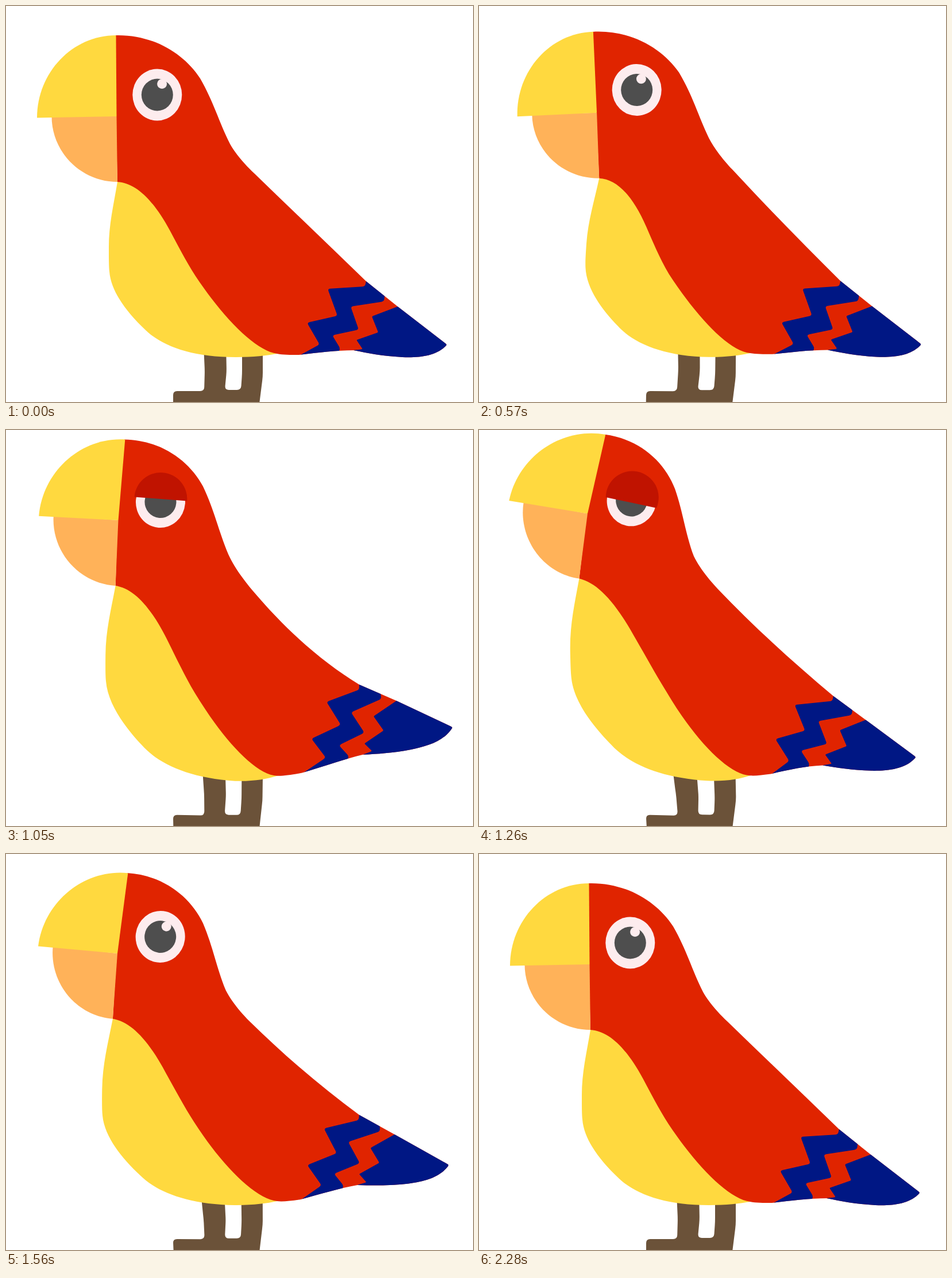
An HTML page for the animation above (2310 ms loop, 813 px wide and 689 px high).

```html
<!DOCTYPE html>
<html>
<head>
<meta charset="utf-8">
<style>
html, body { margin: 0; width: 100%; height: 100%; overflow: hidden; background: #fff; }
svg { display: block; width: 813px; height: 689px; }
</style>
</head>
<body>
<svg viewBox="0 0 813 689">
  <clipPath id="clip"><path id="outline"/></clipPath>
  <g id="bird"></g>
  <g id="eye">
    <ellipse rx="43" ry="45" fill="#fdecee"/>
    <ellipse rx="27.5" ry="28" fill="#4e4e4e"/>
    <circle cx="8.3" cy="-19" r="8.5" fill="#fdecee"/>
    <path id="lid" fill="#c01300"/>
  </g>
</svg>
<script>
const LOOP = 2310, STEP = 30;
const RED = '#e02400', YELLOW = '#ffd93f', BLUE = '#001784';
const byId = id => document.getElementById(id);

// Closed polygon with softened corners.
function soft(text, radius) {
  const pts = text.split(', ').map(p => p.split(' ').map(Number));
  const toward = (p, q) => {
    const k = radius / Math.hypot(q[0] - p[0], q[1] - p[1]);
    return p.map((v, i) => (v + (q[i] - v) * k).toFixed(1)).join(' ');
  };
  return pts.map((p, i) => {
    const before = pts.at(i - 1), after = pts[(i + 1) % pts.length];
    return `${i ? 'L' : 'M'}${toward(p, before)} Q${p.join(' ')} ${toward(p, after)}`;
  }).join(' ') + ' Z';
}

// Quarter ellipse sector from a top or bottom point to a side point.
function quarter(from, to, corner) {
  const ease = p => [p[0] + (to[0] - p[0]) * 0.55, p[1] + (from[1] - p[1]) * 0.55].join(' ');
  return `M${from.join(' ')} C${ease(from)} ${ease(to)} ${to.join(' ')} L${corner.join(' ')} Z`;
}

const joint = [192.5, 192], crown = [191.5, 51], chin = [194, 306], tailRoot = [627, 479];

const plumage = 'M190 51 C256 49 310 83 338 126 C362 168 370 200 390 240 C400 258 418 278 432 291 '
  + 'C497 354 562 416 627 479 L682 523 L765 587 Q768 589 766 591 C748 610 718 612 690 611 '
  + 'C655 609 630 604 605 599 C575 599 545 603 510 607 C495 607 482 607 472 605 '
  + 'C435 600 380 545 330 470 C312 442 298 414 285 390 C255 335 225 308 194 306 L191 192 Z';
const belly = 'M194 306 C187 348 179 380 179 420 C179 440 179 452 180 462 C183 500 215 537 240 561 '
  + 'C268 590 320 611 400 611 C430 611 455 608 472 605 L480 590 L340 440 L240 310 Z';
const legs = soft('344 590, 346 635, 345 670, 291 670, 291 700, 440 700, 447 645, 447 590, '
  + '411 590, 411 640, 409 668, 381 668, 384 635, 383 590', 7);
const band = soft('629 468, 625 488, 560 492, 577 539, 524 551, 546 589, 505 611, 574 612, '
  + '582 596, 568 573, 614 563, 600 523, 658 514, 660 498', 4.5);
const tip = soft('692 519, 637 540, 648 568, 610 581, 621 597, 604 599, 604 620, 780 620, 780 570', 2);

// Back to front: fill, resting path, kept inside the plumage or not.
const parts = [
  ['#6b5239', legs],
  [YELLOW, belly],
  [RED, plumage],
  [BLUE, band, true],
  [BLUE, tip, true],
  ['#ffb259', quarter(chin, [79.5, 192], joint)],
  [YELLOW, quarter(crown, [54, 194.5], joint)]
];

// A pose: head x, y, turn; chest x, y; tail x, y, turn.
const rest = Array(8).fill(0);
const lean = [21, -10.5, -2.8, 9, -12, 4, -1, 0];
const flick = [3, -35, 4.1, -6, -25, -12, -36, -13.5];
const stretch = [-3.5, -46.5, 10.4, -19, -29, -10, -16, -1.6];
const settle = [1.5, -19, 6.2, -12, -7, -12, -25, -8.9];

const mix = (a, b, k) => a.map((v, i) => v + (b[i] - v) * k);
const poseKeys = [[0, rest], [450, rest], [570, mix(rest, lean, 0.6)], [810, lean], [1050, flick],
  [1260, stretch], [1360, mix(flick, stretch, 1.2)], [1560, settle], [1800, rest], [LOOP, rest]];
const lidKeys = [[0, [-46]], [930, [-46]], [1050, [0]], [1200, [9]], [1400, [9]], [1530, [-46]], [LOOP, [-46]]];

// Monotone cubic interpolation of every channel.
function sample(keys, t) {
  let i = 0;
  while (i < keys.length - 2 && keys[i + 1][0] <= t) i++;
  const span = keys[i + 1][0] - keys[i][0], s = (t - keys[i][0]) / span;
  return keys[i][1].map((v, c) => {
    const slope = j => keys[j] && keys[j + 1]
      ? (keys[j + 1][1][c] - keys[j][1][c]) / (keys[j + 1][0] - keys[j][0]) : 0;
    const tangent = j => {
      const a = slope(j - 1), b = slope(j);
      return a * b > 0 ? 2 * a * b / (a + b) * span : 0;
    };
    return v + (keys[i + 1][1][c] - v) * s * s * (3 - 2 * s)
      + tangent(i) * s * (1 - s) ** 2 - tangent(i + 1) * s * s * (1 - s);
  });
}

// Shift of point p when turned about a pivot that itself moves by (x, y).
function swing(p, pivot, x, y, degrees) {
  const a = degrees * Math.PI / 180, dx = p[0] - pivot[0], dy = p[1] - pivot[1];
  return [x + dx * (Math.cos(a) - 1) - dy * Math.sin(a), y + dx * Math.sin(a) + dy * (Math.cos(a) - 1)];
}

// Each bone turns a pose into the shift of its pins.
const head = (p, [x, y, turn]) => swing(p, joint, x, y, turn * (1 + 0.22 * (joint[1] - p[1]) / 114));
const chest = (kx, ky) => (p, pose) => [pose[3] * kx, pose[4] * ky];
const tail = (p, pose) => swing(p, tailRoot, ...pose.slice(5));
const still = () => [0, 0];
const nape = [390, 240];
const neck = (p, pose) => mix(head(p, pose), chest(1, 1)(p, pose), 0.4);
const back = (p, pose) => [(neck(nape, pose)[0] + pose[5]) / 2, pose[6] / 2 - 1.2 * pose[7]];

const rig = [
  [head, [54, 194], joint, crown, chin, [263, 154]],
  [neck, nape],
  [back, [520, 375]],
  [chest(1, 1), [180, 462]],
  [chest(0.2, 0.55), [322, 455]],
  [chest(0.35, 0.2), [345, 606]],
  [chest(0, 0.13), [472, 605]],
  [tail, tailRoot, [767, 589], [524, 551], [605, 599]],
  [still, [447, 607], [345, 660], [445, 685], [292, 675]]
].flatMap(([bone, ...pins]) => pins.map(at => ({ bone, at })));

const kernel = (x, y, p) => {
  const r = ((x - p[0]) ** 2 + (y - p[1]) ** 2) / 1e4;
  return r ? r * Math.log(r) : 0;
};
const plane = (x, y) => [1, x / 100, y / 100];
const basis = (x, y) => [...rig.map(pin => kernel(x, y, pin.at)), ...plane(x, y)];

// Gauss-Jordan elimination with two right-hand sides.
function solve(m) {
  const n = m.length;
  for (let c = 0; c < n; c++) {
    let best = c;
    for (let r = c + 1; r < n; r++) if (Math.abs(m[r][c]) > Math.abs(m[best][c])) best = r;
    [m[c], m[best]] = [m[best], m[c]];
    for (let r = 0; r < n; r++) {
      if (r === c) continue;
      const f = m[r][c] / m[c][c];
      for (let k = c; k < n + 2; k++) m[r][k] -= f * m[c][k];
    }
  }
  return m.map((row, i) => [row[n] / row[i], row[n + 1] / row[i]]);
}

// Thin-plate warp that spreads the pin shifts over the whole bird.
function makeWarp(pose) {
  const rows = rig.map(({ bone, at }) => [...basis(...at), ...bone(at, pose)]);
  for (let k = 0; k < 3; k++)
    rows.push([...rig.map(pin => plane(...pin.at)[k]), 0, 0, 0, 0, 0]);
  const weights = solve(rows);
  return (x, y) => basis(x, y).reduce(
    (sum, b, i) => [sum[0] + b * weights[i][0], sum[1] + b * weights[i][1]], [x, y]);
}

const paths = parts.map(([fill, , clipped]) => {
  const path = document.createElementNS('http://www.w3.org/2000/svg', 'path');
  path.setAttribute('fill', fill);
  if (clipped) path.setAttribute('clip-path', 'url(#clip)');
  return byId('bird').appendChild(path);
});

function draw(t) {
  const warp = makeWarp(sample(poseKeys, t));
  const bend = d => d.replace(/([\d.]+) ([\d.]+)/g,
    (_, x, y) => warp(+x, +y).map(v => v.toFixed(2)).join(' '));
  parts.forEach(([, d], i) => paths[i].setAttribute('d', bend(d)));
  byId('outline').setAttribute('d', bend(plumage));

  const [x, y] = warp(263.3, 154.5), top = warp(263, 109), low = warp(263, 199);
  const tilt = Math.atan2(top[0] - low[0], low[1] - top[1]) * 180 / Math.PI;
  byId('eye').setAttribute('transform', `translate(${x} ${y}) rotate(${tilt})`);

  const [drop] = sample(lidKeys, t), edge = drop - 5;
  const half = Math.sqrt(Math.max(0, 46 * 46 - drop * drop));
  byId('lid').setAttribute('d', half < 1 ? '' :
    `M${-half} ${edge} A46 46 0 ${drop > 0 ? 1 : 0} 1 ${half} ${edge} Z`);
}

const start = performance.now();
function tick() {
  const t = (performance.now() - start) % LOOP;
  draw(Math.floor(t / STEP) * STEP);
  requestAnimationFrame(tick);
}
tick();
</script>
</body>
</html>
```
